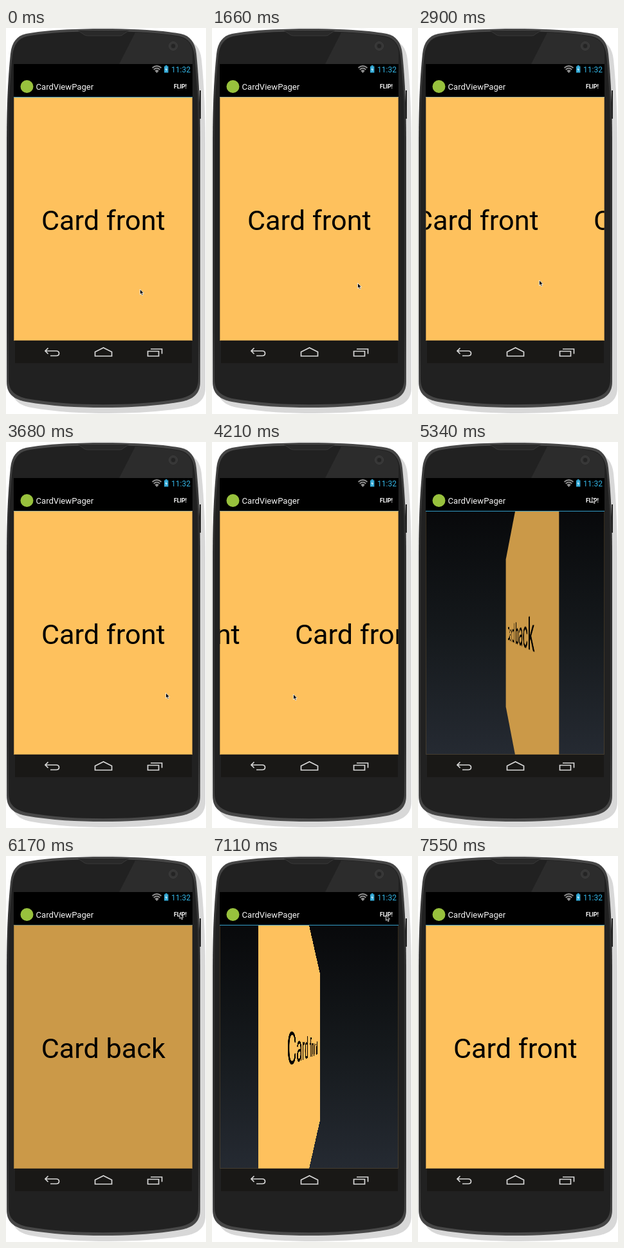
These frames come from a looping animation (311 px wide and 600 px high, 7.97 s). An HTML page:

```html
<!DOCTYPE html>
<html lang="en">
<head>
<meta charset="utf-8">
<title>Card flip</title>
<style>
  html, body { margin: 0; width: 100%; height: 100%; overflow: hidden; background: #fff; }
  #stage { position: relative; width: 311px; height: 600px; overflow: hidden; }
  svg { position: absolute; left: 0; top: 0; display: block; }
  text { font-family: Roboto, sans-serif; }
  #view {
    position: absolute; left: 12px; top: 108px; width: 278px; height: 378px;
    overflow: hidden; perspective: 210px;
    background: linear-gradient(#08090b, #15191c 50%, #252a32);
  }
  .card { overflow: hidden; }
  .card text { font-size: 43.2px; text-anchor: middle; }
</style>
</head>
<body>
<div id="stage">
  <svg width="311" height="600" viewBox="0 0 311 600">
    <defs>
      <linearGradient id="rim" x1="0" y1="0" x2="0" y2="1">
        <stop offset="0" stop-color="#484848"/>
        <stop offset=".2" stop-color="#303030"/>
        <stop offset=".8" stop-color="#303030"/>
        <stop offset="1" stop-color="#4a4a4a"/>
      </linearGradient>
      <path id="body" d="M7 40C9 22 17 12 31 9C62 3 110 1 151.500 1S241 3 272 9C286 12 294 22 296 40C299 70 302 110 302 180V550C302 568 292 577 272 581C232 588 192 590 151.500 590S71 588 31 581C11 577 1 568 1 550V180C1 110 4 70 7 40Z"/>
    </defs>
    <use href="#body" x="8" y="9" fill="#d8d8d8"/>
    <path d="M301 97h2v44h-2z" fill="#1b1b1b"/>
    <use href="#body" fill="url(#rim)"/>
    <use href="#body" fill="#212121" transform="translate(3 4) scale(.98 .985)"/>
    <path d="M201 7Q240 8 270 14Q287 18 290 36V56H176Z" fill="#fff" opacity=".05"/>
    <path d="M112 4L121 10Q123 12 127 12H177Q181 12 182 10L191 4" fill="#292929" stroke="#393939"/>
    <circle cx="260" cy="28" r="6.500" fill="#363636" stroke="#3f3f3f"/>
    <circle cx="260" cy="28" r="3.200" fill="#242424"/>

    <path d="M12 56h278v52H12z" fill="#000"/>
    <path d="M14 486h275v35H14z" fill="#191816"/>
    <rect id="line" x="12" y="107" width="278" height="1"/>
    <rect id="press" x="250" y="73" width="40" height="34" fill="#33b5e5" opacity=".45"/>

    <g fill="none" stroke="#8f8f8f" stroke-width="1.900">
      <path d="M227.500 62Q234.500 56 241.500 62M229.700 64.700Q234.500 60.500 239.300 64.700"/>
      <path d="M231.300 66.400Q234.500 63.800 237.700 66.400L234.500 70Z" fill="#8f8f8f" stroke="none"/>
    </g>
    <path d="M246 59.500h1.800v-1.500h2.800v1.500h1.800v10h-6.400z" fill="#33a9d6"/>
    <path d="M249.800 60.800l-2.200 4.200h1.700l-.8 3.300 2.400-4.300h-1.700z" fill="#e8f6fc"/>
    <text x="257" y="69" font-size="12" fill="#33b5e5">11:32</text>

    <circle cx="32.500" cy="91" r="10" fill="#98c13d"/>
    <text x="46.500" y="96" font-size="13.100" fill="#f4f4f4">CardViewPager</text>
    <text x="271" y="94" font-size="8.700" font-weight="700" text-anchor="middle" fill="#fff">FLIP!</text>

    <g fill="none" stroke="#d8d8d8" stroke-width="1.700">
      <path d="M65.500 497.500L61 502L65.500 506.500M61 502H78Q82.500 502 82.500 505.800T78 509.500H69"/>
      <path d="M138.500 510V503.500L151.500 497L164.500 503.500V510Z"/>
      <path d="M220.500 502.500H237.500V510H220.500ZM225 499H242.500V506.500"/>
    </g>
  </svg>

  <div id="view">
    <svg class="card" id="back" width="278" height="378">
      <rect width="278" height="378" fill="#cb9948"/>
      <text x="139.300" y="205.500">Card back</text>
    </svg>
    <svg class="card" id="front" width="278" height="378">
      <rect width="278" height="378" fill="#fec15d"/>
      <g id="pages">
        <text x="139.300" y="205.500">Card front</text>
        <text x="417.300" y="205.500">Card front</text>
      </g>
    </svg>
  </div>

  <svg width="311" height="600" viewBox="0 0 311 600">
    <clipPath id="screen"><path d="M12 56h278v465H12z"/></clipPath>
    <path d="M12.500 108V485.500H289.500V108" fill="none" stroke="#6e5430" opacity=".45"/>
    <g clip-path="url(#screen)">
      <path id="cursor" d="M0 0V8.300L1.900 6.600L3.200 9.700L4.700 9.100L3.400 6.100H6Z" fill="#0a0a0a" stroke="#fff" stroke-width=".8"/>
    </g>
  </svg>
</div>
<script>
  const LOOP = 7970, STEP = 60, WIDTH = 278, FLIP_TIME = 430;
  const $ = id => document.getElementById(id);

  // Pointer: time, x, y
  const pointer = [
    [480, 208.3, 406], [1290, 236, 395], [1650, 226.5, 396.5], [2230, 226.5, 396.5],
    [2490, 246, 393], [2670, 248.5, 391], [3030, 128.5, 393], [3210, 128.5, 393],
    [3630, 248.5, 390], [3720, 248.5, 390], [4020, 126.5, 392], [4310, 126.5, 392],
    [4950, 270.5, 86], [5820, 270.5, 86], [6150, 270, 89],
    [6820, 270, 89], [7080, 270.5, 92], [7170, 270.5, 92], [7410, 294, 100]
  ];
  // Pager scroll: time, offset
  const scroll = [[2670, 0], [3030, 120], [3390, WIDTH], [3720, WIDTH], [4020, WIDTH + 122], [4310, 2 * WIDTH]];

  const clamp = v => Math.min(1, Math.max(0, v));
  const smooth = v => v * v * (3 - 2 * v);
  const ease = v => (1 - Math.cos(Math.PI * clamp(v))) / 2;
  const within = (t, from, to) => t >= from && t < to;

  function sample(keys, t) {
    const i = keys.findIndex(k => k[0] > t);
    if (i === 0) return keys[0].slice(1);
    if (i < 0) return keys[keys.length - 1].slice(1);
    const a = keys[i - 1], b = keys[i];
    const f = smooth((t - a[0]) / (b[0] - a[0]));
    return a.slice(1).map((v, n) => v + (b[n + 1] - v) * f);
  }

  function turn(card, angle) {
    card.style.visibility = Math.abs(angle) < 90 ? 'visible' : 'hidden';
    card.style.transform = angle ? `rotateY(${angle}deg)` : 'none';
  }

  function draw(time) {
    const t = Math.max(0, Math.floor((time - 30) / STEP) * STEP + 30);
    const flip = ease((t - 5080) / FLIP_TIME) - ease((t - 6877.5) / FLIP_TIME);
    turn($('front'), 180 * flip);
    turn($('back'), 180 * flip - 180);

    const [offset] = sample(scroll, t);
    $('pages').setAttribute('transform', `translate(${-(offset % WIDTH)} 0)`);
    const [x, y] = sample(pointer, t);
    $('cursor').setAttribute('transform', `translate(${x} ${y})`);

    const pressed = within(time, 5080, 5140) || within(time, 6820, 6880);
    $('press').style.display = pressed ? '' : 'none';
    // The divider fades while the screen rests
    const resting = within(time, 330, 5080) || within(time, 5510, 6820);
    $('line').setAttribute('fill', !resting ? '#349fcb' : flip ? '#73877a' : '#9fb098');
  }

  const start = performance.now();
  function tick() {
    draw((performance.now() - start) % LOOP);
    requestAnimationFrame(tick);
  }
  tick();
</script>
</body>
</html>
```
